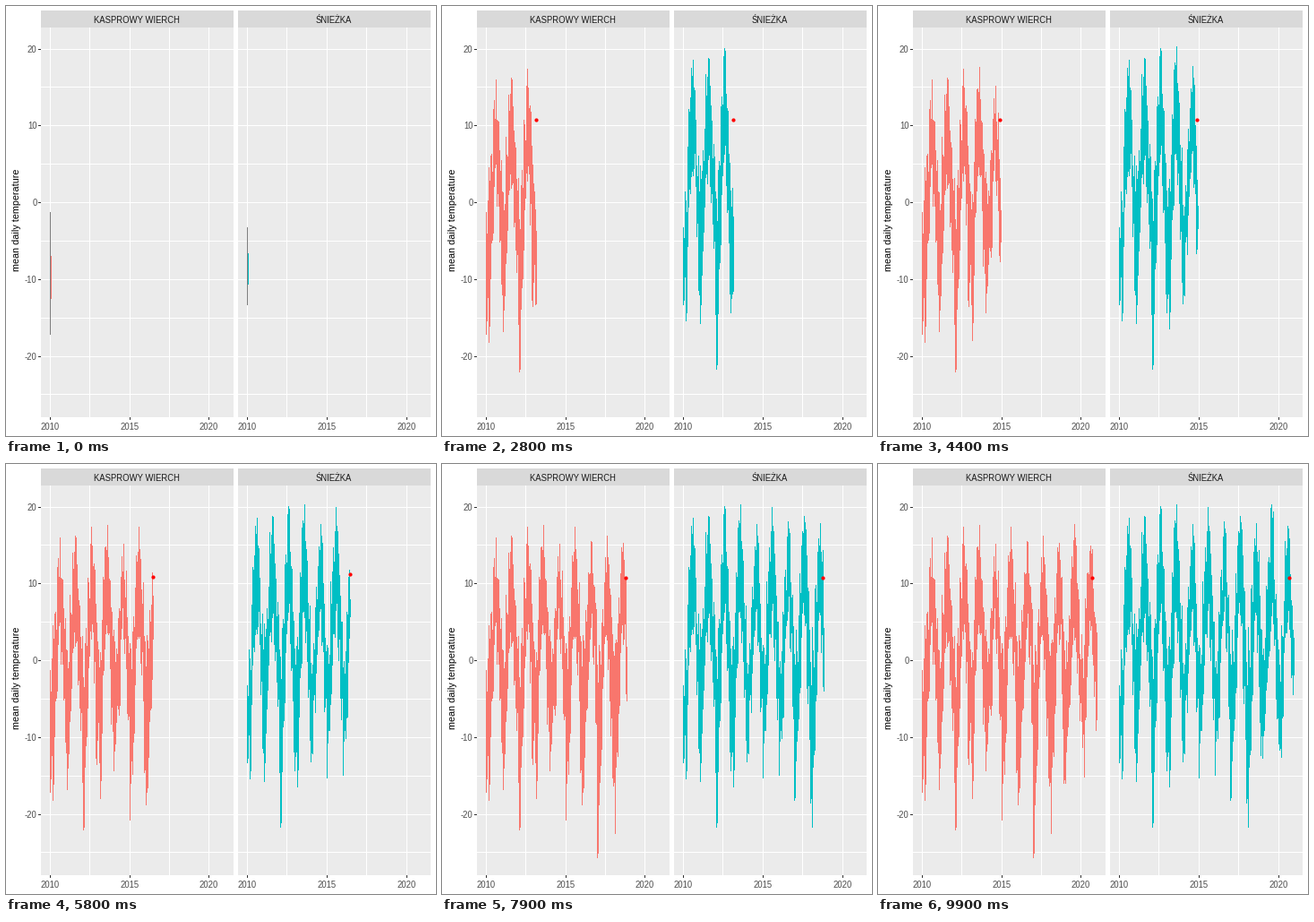
These frames come from a looping animation (480x480 px, 10000 ms). A matplotlib script:

```python
import numpy as np
import matplotlib.pyplot as plt
from matplotlib.animation import FuncAnimation
from matplotlib.collections import PolyCollection
from matplotlib.patches import Rectangle

SIZE, FRAMES, YEARS = 480, 100, 11
PX_YEAR = 17.74
COLS = 196
TOP, BOTTOM = 24, 459

# Yearly key points: summer peak, and the month of the winter low.
PEAKS = np.array([16, 16.3, 17.5, 17.7, 15.2, 17.4, 15.6, 16.3, 15.3, 17.8, 15])
COLD_MONTH = [2, 1, 1, 2, 0, 0, 0, 0, 1, 0, 2]

plt.rcParams["font.family"] = "Liberation Sans"
fig = plt.figure(figsize=(SIZE / 72, SIZE / 72), dpi=72, facecolor="white")
ax = fig.add_axes([0, 0, 1, 1])
ax.set(xlim=(0, SIZE), ylim=(SIZE, 0))
ax.axis("off")


def to_y(temp):
    return 219.55 - 8.574 * np.asarray(temp)


def box(x, y, w, h, color):
    ax.add_patch(Rectangle((x, y), w, h, fc=color, lw=0, aa=False))


def label(x, y, text, size, color, ha="center", **kw):
    ax.text(x, y, text, fontsize=size, color=color, ha=ha,
            **{"va": "baseline", **kw})


def draw_panel(left, title):
    box(left, 5, 215, 19, "#D9D9D9")
    box(left, TOP, 215, BOTTOM - TOP, "#EBEBEB")
    for temp in range(-25, 25, 5):
        box(left, int(to_y(temp)), 215, 1, "white")
    for year in np.arange(0, 12.5, 2.5):
        x = int(left + 10.6 + year * PX_YEAR)
        if year < 12:
            box(x, TOP, 1, BOTTOM - TOP, "white")
        if year % 5 == 0:
            box(x, BOTTOM, 1, 3, "#333333")
            label(x + 0.5, 472.6, str(2010 + int(year)), 9.5, "#4D4D4D")
    label(left + 107, 19, title, 9.5, "#1A1A1A")


class Station:
    """Monthly temperature ranges, one bar for each pixel column."""

    def __init__(self, left, color, seed, peaks, colds, mild, cool, first):
        self.x0, self.color = left + 10, color
        rng = np.random.default_rng(seed)
        peak, cold = peaks[:, None], np.array(colds)[:, None]
        warmth = (1 - np.cos(2 * np.pi * (np.arange(12) - .7) / 12)) / 2
        noise = rng.normal(0, 1.5, (2, YEARS, 12))

        # The range swings with the seasons and touches each year's extremes.
        hi = mild + (peak - 1.2 - mild) * warmth + noise[0]
        lo = .75 * cold + (cool - .75 * cold) * warmth + noise[1]
        hi, lo = np.minimum(hi, peak - .5), np.maximum(lo, cold + 1)
        hi[:, 7] = peaks
        lo[np.arange(YEARS), COLD_MONTH] = colds
        hi[0, 0], lo[0, 0] = first

        month = (np.arange(COLS) * 12 / PX_YEAR + .15).astype(int).clip(0, 131)
        repeat = np.r_[False, month[1:] == month[:-1]]
        self.hi = hi.ravel()[month] - repeat * rng.uniform(0, 3, COLS)
        self.lo = lo.ravel()[month] + repeat * rng.uniform(0, 3, COLS)

        # Warm days carry the dot; it glides straight across each winter.
        phase = np.linspace(0, 1, 8)
        self.days = np.add.outer(np.arange(YEARS), .42 + .28 * phase).ravel()
        self.temps = 10.8 + (rng.uniform(0, 2.6, (YEARS, 8))
                             * np.sin(np.pi * phase)).ravel()

        self.bars = PolyCollection([], lw=0, antialiased=False, zorder=3)
        ax.add_collection(self.bars, autolim=False)
        self.dot, = ax.plot([], [], "o", ms=4.2, mew=0, color="red", zorder=4)

    def show(self, k):
        t = k * YEARS / (FRAMES - 1)
        n = min(int(t * PX_YEAR + 1.5) + 1, COLS)
        hi, lo = self.hi[:n].copy(), self.lo[:n].copy()
        if k < FRAMES - 1:  # the newest month is still growing
            inset = .25 * (hi[-1] - lo[-1])
            hi[-1], lo[-1] = hi[-1] - inset, lo[-1] + inset
        xs = self.x0 + np.arange(n)
        tops, ends = np.round(to_y(hi)), np.round(to_y(lo))
        self.bars.set_verts([[(x, a), (x + 1, a), (x + 1, b), (x, b)]
                             for x, a, b in zip(xs, tops, ends)])
        self.bars.set_facecolor(["#7F7F7F", self.color] if k == 0
                                else self.color)
        if t < self.days[0]:
            self.dot.set_data([], [])
        else:
            day = min(t, self.days[-1])
            temp = np.interp(day, self.days, self.temps)
            self.dot.set_data([self.x0 + .5 + day * PX_YEAR], [to_y(temp)])
        return self.bars, self.dot


draw_panel(39, "KASPROWY WIERCH")
draw_panel(259, "ŚNIEŻKA")
for temp in range(-20, 30, 10):
    y = int(to_y(temp))
    box(36, y, 3, 1, "#333333")
    label(34.5, y + 4, str(temp), 9.5, "#4D4D4D", "right")
label(12.5, 239, "mean daily temperature", 10.8, "black",
      rotation=90, va="center")

stations = [
    Station(39, "#F8766D", 4, PEAKS,
            [-18.2, -16.8, -22.1, -18, -14.4, -20.8,
             -18.8, -25.7, -22.6, -16, -15.2],
            mild=.5, cool=3, first=(-1.2, -17.2)),
    Station(259, "#00BFC4", 9, PEAKS + 2.6,
            [-15.5, -15.8, -21.8, -16.5, -13.2, -15.3,
             -15, -18.2, -21.8, -12.8, -12.7],
            mild=1, cool=5, first=(-3.2, -13.4)),
]


def update(k):
    return [artist for s in stations for artist in s.show(k)]


anim = FuncAnimation(fig, update, frames=FRAMES, interval=100,
                     repeat=True, repeat_delay=0)
plt.show()
```
